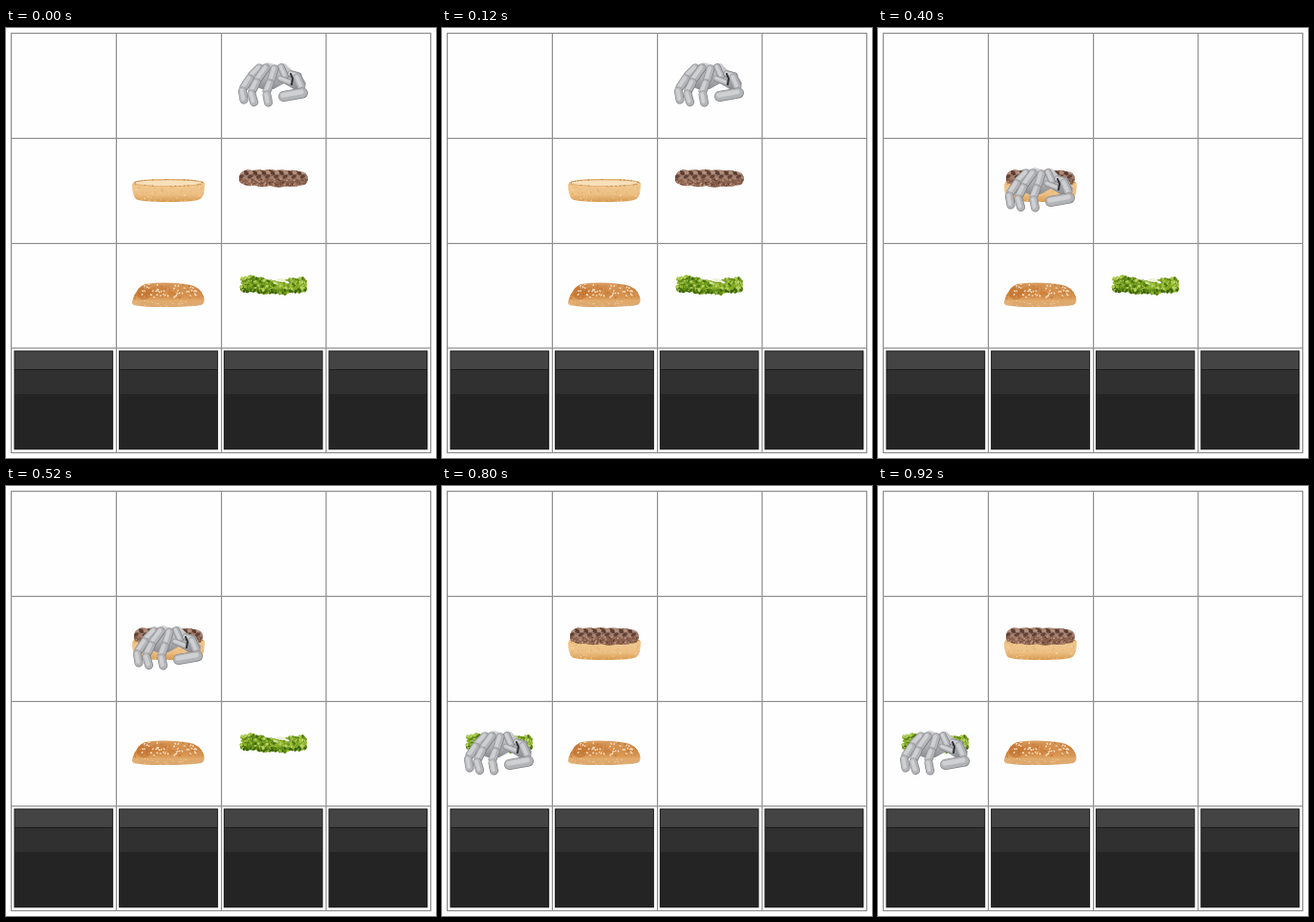
These frames come from a looping animation (450 px wide and 450 px high, 1000 ms). An HTML page with a canvas:

```html
<!DOCTYPE html>
<html lang="en">
<head>
<meta charset="utf-8">
<title>Burger assembly</title>
<style>
  html, body { margin: 0; width: 100%; height: 100%; overflow: hidden; background: #fefefe; }
  canvas { display: block; width: 450px; height: 450px; }
</style>
</head>
<body>
<canvas id="stage" width="450" height="450"></canvas>
<script>
const ctx = document.getElementById('stage').getContext('2d');
const CELL = 110;
const STEP = 200;

// Grid offsets (columns, rows) of the hand, patty and lettuce at each step.
const steps = [
  { hand: [0, 0],  patty: [0, 0],  lettuce: [0, 0] },
  { hand: [0, 1],  patty: [0, 0],  lettuce: [0, 0] },
  { hand: [-1, 1], patty: [-1, 0], lettuce: [0, 0] },
  { hand: [0, 2],  patty: [-1, 0], lettuce: [0, 0] },
  { hand: [-2, 2], patty: [-1, 0], lettuce: [-2, 0] }
];

function seeded(seed) {
  return () => {
    seed = (seed * 1664525 + 1013904223) % 4294967296;
    return seed / 4294967296;
  };
}

function rect(x, y, w, h, color) {
  ctx.fillStyle = color;
  ctx.fillRect(x, y, w, h);
}

function oval(x, y, rx, ry, color, angle = 0) {
  ctx.fillStyle = color;
  ctx.beginPath();
  ctx.ellipse(x, y, rx, ry, angle, 0, Math.PI * 2);
  ctx.fill();
}

function shade(y0, y1, ...colors) {
  const g = ctx.createLinearGradient(0, y0, 0, y1);
  colors.forEach((c, i) => g.addColorStop(i / (colors.length - 1), c));
  return g;
}

function place([col, row], draw) {
  ctx.save();
  ctx.translate(col * CELL, row * CELL);
  draw();
  ctx.restore();
}

// Scatter small flecks over the box; the caller sets the clip.
function flecks(rnd, n, [x, y, w, h], colors, size) {
  for (let i = 0; i < n; i++) {
    const r = size * (0.5 + rnd());
    oval(x + rnd() * w, y + rnd() * h, r, r * 0.75,
      colors[Math.floor(rnd() * colors.length)], rnd() * 3);
  }
}

function drawGrid() {
  rect(0, 0, 450, 450, '#fefefe');
  const lines = [5, 115, 225, 334.5, 444];
  for (const [pad, color] of [[0.4, '#e4e4e4'], [0, '#8c8c8c']]) {
    for (const p of lines) {
      rect(p - pad, 5, 1 + 2 * pad, 440, color);
      rect(5, p - pad, 440, 1 + 2 * pad, color);
    }
  }
  const size = 103.8;
  for (let i = 0; i < 4; i++) {
    const x = 8.4 + i * 109.7;
    rect(x, 337.5, size, size, '#1c1c1c');
    rect(x + 1, 338.5, size - 2, 18.5, '#444444');
    rect(x + 1, 358, size - 2, 25, '#303030');
    rect(x + 1, 383, size - 2, 57.3, '#242424');
  }
}

function drawBase() {
  const rnd = seeded(12);
  const body = new Path2D('M132 164 Q133 158 170 158 Q207 158 208 163 Q208 175 204 178.5 Q200 182 170 182 Q140 182 136 179 Q132 175 132 164Z');
  ctx.save();
  ctx.clip(body);
  rect(130, 156, 80, 28, shade(158, 182, '#e5b06b', '#efc68d', '#edc084', '#d6984f'));
  flecks(rnd, 130, [132, 164, 76, 18], ['#f4d3a0', '#e2b072', '#eec48b', '#e5b57a'], 0.8);
  ctx.restore();
  oval(170, 162, 36.5, 3.8, '#d9a566');
  oval(170, 162.2, 35.5, 3, '#f7e0ba');
  for (let i = 0; i < 46; i++) {
    const a = i / 46 * Math.PI * 2;
    oval(170 + 36 * Math.cos(a), 162 + 3.5 * Math.sin(a), 0.8, 0.6,
      rnd() < 0.5 ? '#bd8448' : '#e8bb7b');
  }
}

function drawCrown() {
  const rnd = seeded(31);
  const body = new Path2D('M132 288 Q132 283 136 277 Q140 268 149 267.5 Q168 265 191 268.5 Q203 270.5 207 281 Q209 288 204 290 Q186 292.5 160 292 Q147 292 137 290.5 Q133 291 132 288Z');
  ctx.save();
  ctx.clip(body);
  rect(130, 264, 80, 30, shade(266, 292, '#dca368', '#cd8443', '#cf833c', '#e2aa6b', '#d9a771'));
  oval(188, 276, 17, 6, '#dc9c5a88', 0.25);
  oval(145, 277, 8, 7, '#c0702d88', -0.6);
  flecks(rnd, 90, [134, 268, 72, 15], ['#c27a39', '#d9975a', '#cb8545'], 0.9);
  flecks(rnd, 70, [134, 285, 74, 7], ['#edc48d', '#dfa966', '#eac592'], 0.8);
  for (let i = 0; i < 46; i++) {
    oval(142 + rnd() * 58, 268 + rnd() * 14, 1.2, 0.7, '#f8e4c8', rnd() * 3);
  }
  ctx.restore();
}

function drawPatty() {
  const rnd = seeded(7);
  const body = new Path2D('M244 157 Q244 152 248 150 Q253 147 258 149.5 Q263 147.5 269 149 Q276 147 282 149 Q289 147.5 295 149.5 Q301 148 306 150 Q312 150 315 154 Q317 158 315 161 Q314 165 308 164.5 Q302 167 294 165.5 Q285 168 276 165 Q268 167.5 260 164.5 Q252 166.5 248 163 Q243 162 244 157Z');
  ctx.save();
  ctx.clip(body);
  rect(242, 145, 76, 24, shade(148, 167, '#a98470', '#987363', '#8a6250', '#7c5442'));
  flecks(rnd, 200, [243, 147, 74, 20], ['#b8927d', '#a07662', '#74503f', '#906653'], 0.8);
  // Crossed sear marks leave paler lumps between them.
  for (let i = 0; i < 8; i++) {
    const x = 246 + i * 9.2;
    oval(x + 5, 151.5, 3.4, 1.9, '#5b3d31', 0.5);
    oval(x, 155.5, 2.8, 1.7, '#614236', -0.5);
    oval(x + 1, 151.5, 2.6, 1.8, '#b28f7c');
    oval(x + 5, 156.5, 2.7, 1.6, '#a68270');
  }
  flecks(rnd, 220, [243, 158, 74, 9], ['#c7a18c', '#835743', '#5a392c', '#a77c67'], 0.75);
  ctx.restore();
}

function drawLettuce() {
  const rnd = seeded(54);
  const greens = ['#7fa822', '#a0c33c', '#5f8a18', '#8eb52d', '#6f991c', '#456d10', '#b9d263'];
  // Upper and lower edge of the leaf along its width.
  const top = t => 261.5 - 2 * Math.sin(t * 9) + 2.5 * t - Math.cos(t * 40) * 0.7;
  const low = t => 275 + 3 * Math.sin(t * 3.1) + Math.sin(t * 22);
  ctx.fillStyle = '#6c951c';
  ctx.beginPath();
  for (let t = 0; t <= 1; t += 0.05) ctx.lineTo(246 + t * 68, top(t));
  for (let t = 1; t >= 0; t -= 0.05) ctx.lineTo(246 + t * 68, low(t));
  ctx.fill();
  for (let i = 0; i < 520; i++) {
    const t = rnd(), d = rnd();
    const r = 0.8 + rnd() * 1.2;
    const c = d > 0.75 && rnd() < 0.4 ? '#3d620d' : greens[Math.floor(rnd() * greens.length)];
    oval(246 + t * 68, top(t) + d * (low(t) - top(t)), r, r * 0.8, c, rnd() * 3);
  }
  oval(288, 264, 5, 1.8, '#eef0da', 0.1);
  oval(294, 266, 3, 1.2, '#f5f3e9', 0.3);
  oval(282, 267, 2, 1, '#dbe4ae');
  flecks(rnd, 24, [306, 265, 9, 7], ['#93b92e', '#c0d96a', '#a8c843'], 0.9);
}

// A metal segment: dark rim, grey body and a light stripe.
function bone(x1, y1, x2, y2, w) {
  const line = (shift, width, color) => {
    ctx.strokeStyle = color;
    ctx.lineWidth = width;
    ctx.beginPath();
    ctx.moveTo(x1 + shift, y1 + shift);
    ctx.lineTo(x2 + shift, y2 + shift);
    ctx.stroke();
  };
  line(0, w, '#808184');
  line(-0.2, w - 1.2, '#b3b4b7');
  line(-w * 0.1, w * 0.42, '#cfd0d2');
}

function drawHand() {
  ctx.lineCap = 'round';
  ctx.fillStyle = shade(38, 66, '#cfd0d2', '#b2b3b6', '#85868a');
  ctx.fill(new Path2D('M264 40 L274 36 L284 39 L292 37 L299 44 L308 47 L314 58 L311 65 L301 64 L291 58 L280 64 L268 64 L258 60Z'));
  bone(288, 41, 292, 50, 7.5);
  bone(298, 48, 306, 50, 7);
  bone(287, 53, 297, 57, 6.5);
  bone(305, 52, 309, 61, 9);
  ctx.strokeStyle = '#303134';
  ctx.lineWidth = 2;
  ctx.stroke(new Path2D('M298 48 L300 53 L299 59'));
  bone(290.5, 71.5, 310.5, 68, 11);
  // Each finger runs knuckle, middle, tip.
  const fingers = [
    [265, 42, 257, 50, 255, 53, 249, 62, 247.5, 66, 249, 75],
    [272, 42, 264, 53, 262, 57, 258, 65, 257, 69, 259.5, 77.5],
    [281, 43, 278, 53, 276, 58, 273, 66, 273, 70, 274.5, 78]
  ];
  for (const f of fingers) {
    bone(...f.slice(0, 4), 9);
    bone(...f.slice(4, 8), 9);
    bone(...f.slice(8), 9);
  }
}

function render(step) {
  drawGrid();
  drawBase();
  drawCrown();
  place(step.patty, drawPatty);
  place(step.lettuce, drawLettuce);
  place(step.hand, drawHand);
}

let shown = -1;
function tick(now) {
  const i = Math.floor(now / STEP) % steps.length;
  if (i !== shown) {
    shown = i;
    render(steps[i]);
  }
  requestAnimationFrame(tick);
}
tick(performance.now());
</script>
</body>
</html>
```
